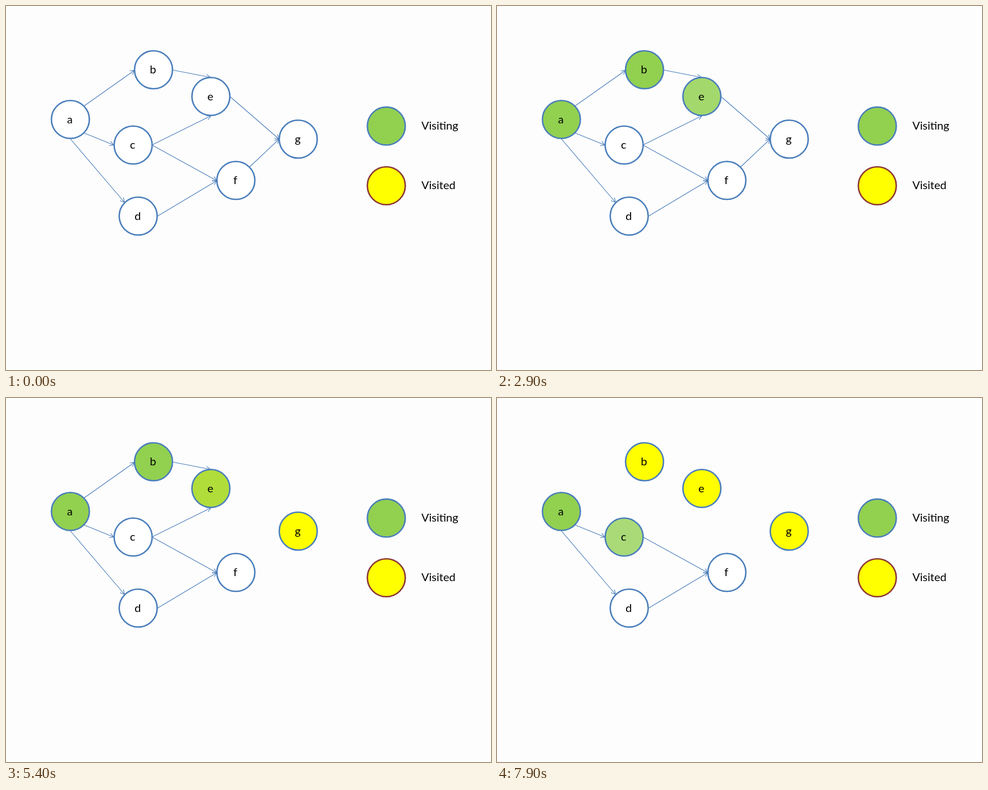
Write an HTML page that moves like this. It is 864 px wide and 648 px high and loops after 8000 ms.

```html
<!DOCTYPE html>
<html>
<head>
<meta charset="utf-8">
<title>Depth-first visit order</title>
<style>
  html, body { margin: 0; width: 100%; height: 100%; overflow: hidden; background: #fdfdfd; }
  svg { display: block; width: 864px; height: 648px; }
  text { font: 20px Lato, Carlito, sans-serif; fill: #000; }
  .mid { text-anchor: middle; }
  circle { stroke: #4a7ebb; stroke-width: 2.6; }
  path { stroke: #4a7ebb; stroke-width: 1.1; fill: none; }
</style>
</head>
<body>
<svg id="stage" viewBox="0 0 864 648"></svg>
<script>
const LOOP = 8000, STEP = 100;
const WHITE = [255, 255, 255], GREEN = [146, 208, 80], YELLOW = [255, 255, 0], BLUE = [79, 129, 189];
const stage = document.getElementById('stage');

function add(tag, attrs, text) {
  const el = document.createElementNS('http://www.w3.org/2000/svg', tag);
  for (const k in attrs) el.setAttribute(k, attrs[k]);
  if (text) el.textContent = text;
  return stage.appendChild(el);
}
const rgb = c => `rgb(${c.map(Math.round)})`;
const disc = (cx, cy, fill) => add('circle', { cx, cy, r: 33.8, fill: rgb(fill) });

// name: centre, then [time, colour] stops
const nodes = {
  a: [114.7, 202, [50, WHITE], [1050, GREEN]],
  b: [262.8, 113.5, [1050, WHITE], [2050, GREEN], [6120, GREEN], [7120, YELLOW]],
  c: [226.5, 247.5, [7120, WHITE], [8120, GREEN]],
  d: [235.5, 374, [0, WHITE]],
  e: [365, 161, [2060, WHITE], [3060, GREEN], [5120, GREEN], [6120, YELLOW]],
  f: [409.5, 310.5, [0, WHITE]],
  g: [520.6, 237, [3100, WHITE], [3100, BLUE], [3700, [82, 200, 139]], [4110, GREEN],
      [4700, [158, 227, 27]], [5110, YELLOW]]
};

// start, end, time of removal
const edges = [
  [139, 178, 229, 114.5, 7120],
  [139, 226, 192, 247.5],
  [115, 237, 211, 349.5],
  [297, 114, 364, 127, 6120],
  [261, 247, 365, 195.5, 6120],
  [261, 248, 375.5, 311],
  [270, 374, 375.5, 311],
  [400, 162, 486.5, 237, 5120],
  [433.5, 287, 486.5, 237, 5120]
];

const discs = Object.entries(nodes).map(([name, [x, y, ...stops]]) => {
  const el = disc(x, y, WHITE);
  add('text', { x: x - 1, y: y + 6.5, class: 'mid' }, name);
  return { el, stops };
});

const arrows = edges.map(([x1, y1, x2, y2, end = Infinity]) => {
  const angle = Math.atan2(y2 - y1, x2 - x1);
  const barb = turn => `${x2 - 8.5 * Math.cos(angle + turn)} ${y2 - 8.5 * Math.sin(angle + turn)}`;
  const el = add('path', { d: `M${x1} ${y1}L${x2} ${y2}M${barb(0.5)}L${x2} ${y2}L${barb(-0.5)}` });
  return { el, end };
});

disc(677.5, 213.7, GREEN);
disc(677.5, 320, YELLOW).style.stroke = '#8c3836';
add('text', { x: 740, y: 219.7 }, 'Visiting');
add('text', { x: 740, y: 326 }, 'Visited');

function colourAt(stops, t) {
  const next = stops.findIndex(s => s[0] > t);
  if (next < 0) return stops[stops.length - 1][1];
  if (next === 0) return stops[0][1];
  const [t0, from] = stops[next - 1], [t1, to] = stops[next];
  const k = (t - t0) / (t1 - t0);
  return from.map((v, i) => v + (to[i] - v) * k);
}

function draw() {
  const t = Math.floor(performance.now() % LOOP / STEP) * STEP;
  for (const { el, stops } of discs) el.setAttribute('fill', rgb(colourAt(stops, t)));
  for (const { el, end } of arrows) el.style.display = t < end ? '' : 'none';
  requestAnimationFrame(draw);
}
draw();
</script>
</body>
</html>
```
